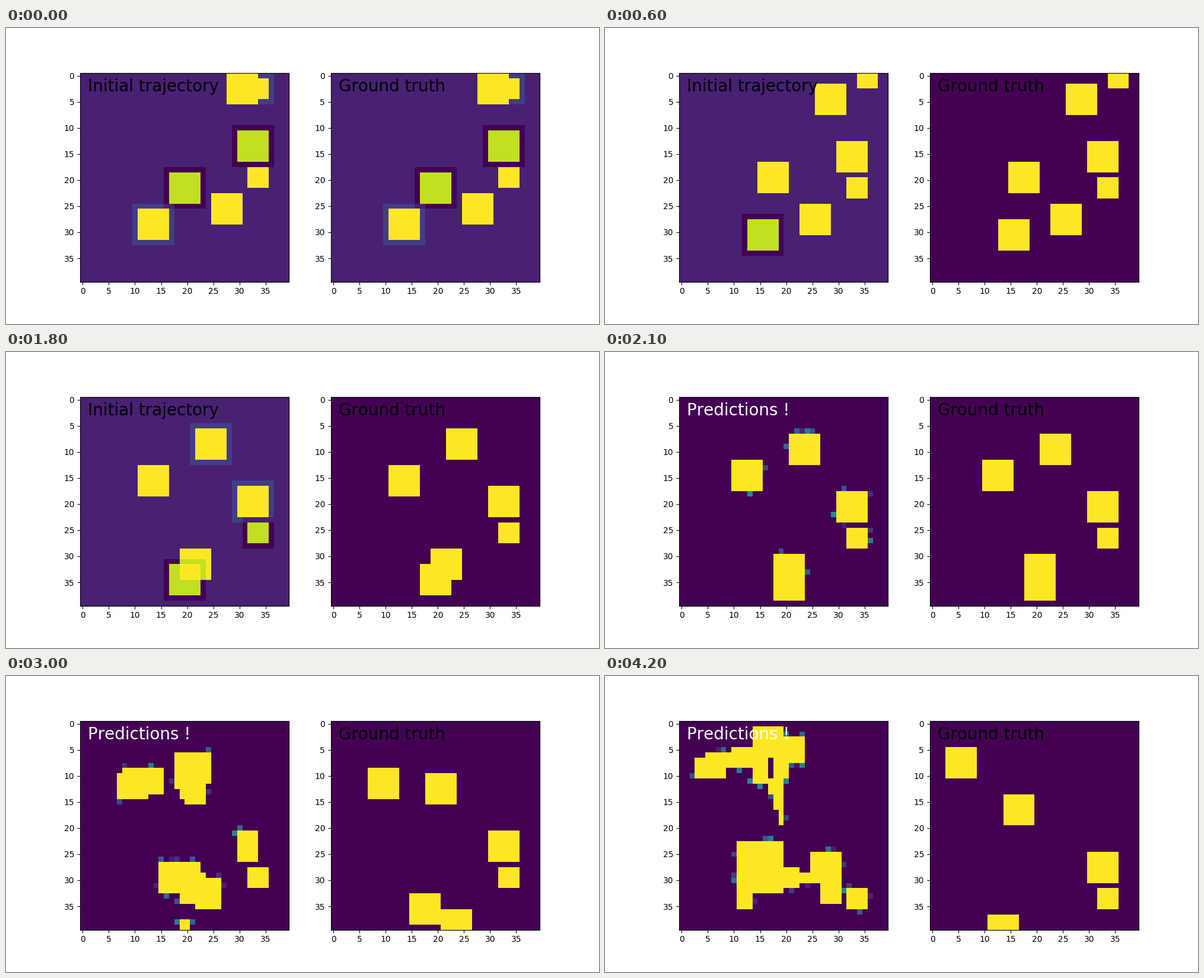
These frames come from a looping animation (1000x500 px, 4.5 s). A matplotlib script:

```python
import numpy as np
import matplotlib.pyplot as plt
from matplotlib.animation import FuncAnimation

SIZE, FRAMES, STEP_MS = 40, 15, 300
FIRST_PREDICTION = 7
MORPH_START, MORPH_END = 8, 14
plt.rcParams.update({"font.family": "DejaVu Sans", "text.kerning_factor": 6})

# x, y, side, dx, dy of each drifting square
SQUARES = [
    (30, 11, 6, 0, 1), (17, 19, 6, -1, -1), (11, 26, 6, 1, 1),
    (25, 23, 6, -1, 1), (32, 18, 4, 0, 1), (28, 0, 6, -1, 1),
    (32, 1, 4, 1, -1),
]
# Squares with a negative or positive noise patch, by frame
LOWERED = {0: [0, 1], 1: [1], 2: [2], 3: [3], 4: [0], 5: [5], 6: [2, 4]}
RAISED = {0: [2, 6], 4: [1], 6: [0, 5]}

# Each predicted blob starts as one box (x0, y0, x1, y1) and spreads into several
BLOBS = [
    ((9, 11, 14, 16), [(3, 7, 8, 10), (5, 6, 10, 8), (10, 5, 16, 8)]),
    ((20, 8, 25, 13), [(14, 1, 19, 6), (18, 3, 23, 7), (14, 6, 16, 11), (18, 8, 20, 10),
                       (17, 11, 19, 13), (18, 13, 19, 16), (19, 15, 19, 19)]),
    ((30, 19, 35, 24), [(30, 25, 29, 30)]),
    ((32, 26, 35, 29), [(32, 32, 35, 35)]),
    ((17, 29, 23, 31), [(11, 23, 19, 32), (11, 28, 22, 31), (11, 32, 13, 35)]),
    ((19, 32, 24, 36), [(25, 25, 30, 30), (20, 29, 28, 30), (27, 31, 30, 34)]),
    ((19, 37, 20, 39), [(19, 40, 20, 42)]),
]


def area(grid, x0, y0, x1, y1):
    """View of the cells in an inclusive box, clipped to the grid."""
    return grid[max(y0, 0):max(y1 + 1, 0), max(x0, 0):max(x1 + 1, 0)]


def squares(frame, noisy=False):
    grid = np.zeros((SIZE, SIZE))
    for k, (x, y, side, dx, dy) in enumerate(SQUARES):
        x, y = x + dx * frame, y + dy * frame
        area(grid, x, y, x + side - 1, y + side - 1)[:] += 1
        if noisy:
            sign = (k in RAISED.get(frame, [])) - (k in LOWERED[frame])
            area(grid, x - 1, y - 1, x + side, y + side)[:] += 0.1 * sign
    return np.minimum(grid, 1)


def blobs(frame):
    grid = np.zeros((SIZE, SIZE))
    s = (frame - MORPH_START) / (MORPH_END - MORPH_START)
    for start, ends in BLOBS:
        for end in ends:
            box = [round(a + (b - a) * s) for a, b in zip(start, end)]
            area(grid, *box)[:] = 1
    return grid


def fringe(grid, seed):
    """Faint, scattered cells along the edges of the filled shapes."""
    rng = np.random.default_rng(seed)
    padded = np.pad(grid, 1)
    near = np.max([padded[:-2, 1:-1], padded[2:, 1:-1],
                   padded[1:-1, :-2], padded[1:-1, 2:]], axis=0)
    scattered = rng.random(grid.shape) < 0.15
    return near * scattered * rng.uniform(0.05, 0.5, grid.shape)


def prediction(frame):
    grid = squares(frame) if frame < MORPH_START else blobs(frame)
    return np.maximum(grid, fringe(grid, frame))


def panel(position, label):
    ax = fig.add_subplot(position)
    image = ax.imshow(squares(0), cmap="viridis")
    return image, ax.text(1, 3, label, fontsize=20, color="black")


def show(image, grid):
    image.set_data(grid)
    image.set_clim(grid.min(), grid.max())


def update(frame):
    predicting = frame >= FIRST_PREDICTION
    show(left, prediction(frame) if predicting else squares(frame, noisy=True))
    show(right, squares(frame, noisy=frame < 2))
    caption.set_text("Predictions !" if predicting else "Initial trajectory")
    caption.set_color("white" if predicting else "black")
    return left, right, caption


fig = plt.figure(figsize=(10, 5), dpi=100)
left, caption = panel(121, "Initial trajectory")
right, _ = panel(122, "Ground truth")

anim = FuncAnimation(fig, update, frames=FRAMES, interval=STEP_MS,
                     repeat=True, repeat_delay=0, blit=False)
plt.show()
```
